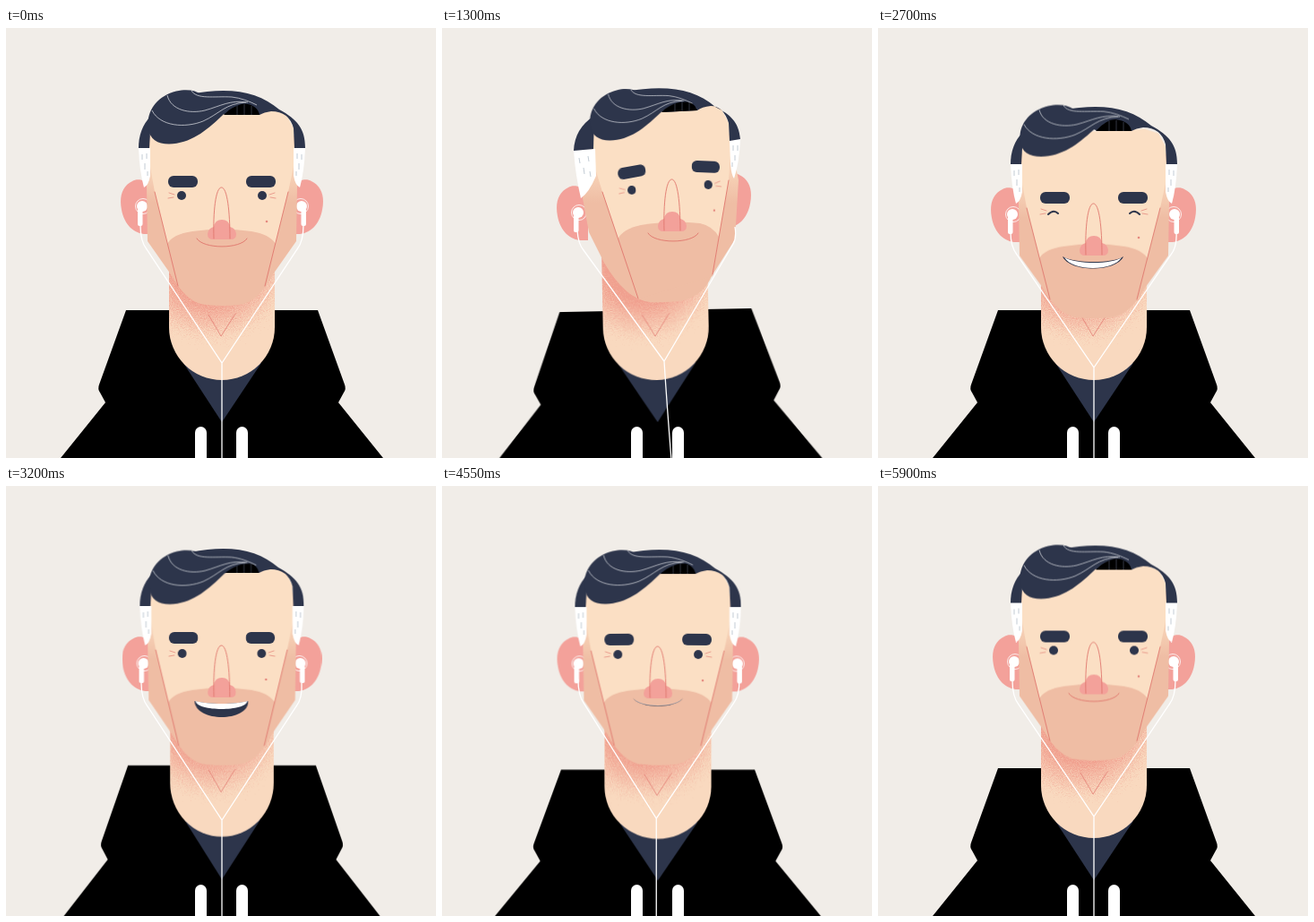
An HTML page without scripts that plays this animation: 480 px wide and 480 px high, repeating every 6000 ms.

```html
<!DOCTYPE html>
<html lang="en">
<head>
<meta charset="utf-8">
<title>Portrait</title>
<style>
html, body { margin: 0; width: 100%; height: 100%; overflow: hidden; background: #f1ede8; }
svg { display: block; width: 100vw; height: 100vh; }

.hair { fill: #2d354b; }
.side { fill: #efbda4; }
.skin { fill: #fbdfc4; }
.pink { fill: #f3a19a; }
.white { fill: #fff; }
.line { fill: none; stroke: #e0776e; stroke-width: .9; stroke-linecap: round; }
.strand { fill: none; stroke: #e4e6ea; stroke-width: .7; }
.closed { fill: none; stroke: #2d354b; stroke-width: 2; stroke-linecap: round; }

.body, .bob, .shell, .eyes, .brow, .nose, .mouth, .quiff, .earL, .earR, .turn, .talk, .cord, .smile, .open, .closed {
  animation: 6s ease-in-out infinite;
}

/* paths that swing between a front view and a three-quarter view */
.turn { animation-name: turn; }
@keyframes turn {
  0%, 39.5%, 100% { d: var(--front); }
  10%, 31% { d: var(--tilt); }
}

.body { animation-name: body; transform-origin: 241px 480px; }
@keyframes body {
  0%, 39.5%, 45%, 85%, 100% { transform: translate(0, 0) scale(1, 1) rotate(0deg); }
  10%, 31% { transform: translate(.5px, 0) scale(1, 1) rotate(-1.1deg); }
  48% { transform: translate(0, 0) scale(1.01, .99) rotate(0deg); }
  53%, 69.5% { transform: translate(0, 0) scale(.98, 1.018) rotate(0deg); }
  76% { transform: translate(0, 0) scale(1.01, .99) rotate(0deg); }
}

.bob { animation-name: bob; transform-origin: 241px 180px; }
@keyframes bob {
  0%, 10%, 29% { transform: translate(0, 0) scale(1); }
  33.5% { transform: translate(0, 5px) scale(1); }
  40% { transform: translate(0, 10px) scale(1); }
  44%, 46% { transform: translate(0, 18px) scale(1); }
  53.3% { transform: translate(0, 0) scale(.985, 1); }
  61% { transform: translate(1px, -6px) scale(.98, 1); }
  68.3% { transform: translate(1.5px, -7px) scale(.977, 1); }
  71.5% { transform: translate(1px, -9px) scale(.98, 1); }
  77.5% { transform: translate(0, 3px) scale(1); }
  85% { transform: translate(0, -1.5px) scale(1); }
  98.3%, 100% { transform: translate(0, -3.5px) scale(1); }
}

.shell { animation-name: shell; transform-origin: 241px 180px; }
@keyframes shell {
  0%, 39%, 78%, 100% { transform: scaleY(1); }
  44%, 46% { transform: scaleY(.97); }
  53.3% { transform: scaleY(1.015); }
  68.3% { transform: scaleY(1.05); }
}

.quiff { animation-name: quiff; transform-origin: 270px 69px; }
@keyframes quiff {
  0%, 39%, 98.3%, 100% { transform: translateY(0) scale(1); }
  10%, 31% { transform: translateY(-1px) scale(.94, .95); }
  45% { transform: translateY(-1.5px) scale(1, .96); }
  53.3% { transform: translateY(2.5px) scale(1); }
  68.3% { transform: translateY(.5px) scale(1); }
  85% { transform: translateY(2px) scale(1); }
}

.earL { animation-name: earL; }
@keyframes earL {
  0%, 39%, 78%, 100% { transform: translate(0, 0); }
  10%, 31% { transform: translate(0, 7px); }
  44%, 46% { transform: translate(-2px, 9px); }
  53.3% { transform: translate(1.5px, -1px); }
  68.3% { transform: translate(5px, -7px); }
  85% { transform: translate(-1px, -1px); }
  98.3% { transform: translate(0, -3px); }
}
.earR { animation-name: earR; }
@keyframes earR {
  0%, 39%, 78%, 100% { transform: translate(0, 0); }
  10%, 31% { transform: translate(-9px, -7px); }
  44%, 46% { transform: translate(1px, 9px); }
  53.3% { transform: translate(-1.5px, -1px); }
  68.3% { transform: translate(-1px, -6px); }
  85% { transform: translate(1px, -1px); }
  98.3% { transform: translate(0, -3px); }
}

.eyes { animation-name: eyes; transform-origin: 241px 180px; }
@keyframes eyes {
  0%, 39.5%, 100% { transform: translate(0, 0) rotate(0deg) scale(1, 1); }
  10%, 31% { transform: translate(13px, -9px) rotate(-4deg) scale(.95, 1); }
}
.brow { animation-name: brow; transform-box: fill-box; transform-origin: center; }
@keyframes brow {
  0%, 39%, 46%, 78%, 100% { transform: translateY(0) rotate(0deg); }
  10%, 31% { transform: translateY(-4.7px) rotate(-6deg); }
  53.3% { transform: translateY(-2px) rotate(0deg); }
  66%, 70% { transform: translateY(-7.5px) rotate(-3deg); }
}
.open, .closed { animation-timing-function: step-end; }
.open { animation-name: open; }
.closed { animation-name: closed; }
@keyframes open { 0%, 49%, 100% { opacity: 1; } 42.5% { opacity: 0; } }
@keyframes closed { 0%, 49%, 100% { opacity: 0; } 42.5% { opacity: 1; } }

.nose { animation-name: nose; }
@keyframes nose {
  0%, 39.5%, 100% { transform: translate(0, 0); }
  10%, 31% { transform: translate(16px, -9px); }
}
.mouth { animation-name: mouth; }
@keyframes mouth {
  0%, 39.5%, 100% { transform: translate(0, 0); }
  10%, 31% { transform: translate(17px, -6px); }
}
.talk { animation-name: talk; }
@keyframes talk {
  0%, 41%, 77%, 100% { d: var(--shut); }
  44%, 47% { d: var(--grin); }
  52%, 70% { d: var(--open); }
}
.smile { animation-name: smile; animation-timing-function: step-end; }
@keyframes smile { 0%, 76.8%, 100% { opacity: 1; } 41.2% { opacity: 0; } }

.cord { animation-name: cord; fill: none; stroke: #fff; stroke-width: 1.3; }
@keyframes cord {
  0%, 39% { d: path("M150 220Q150 238 157 247L241 374Q241 430 241 482M332 220Q332 238 325 247L241 374"); }
  10%, 31% { d: path("M151 226Q152 241 158 248L248 372Q251 420 256 482M327 222Q329 234 325 241L248 372"); }
  44%, 46% { d: path("M148 228Q148 244 155 253L241 379Q241 430 241 482M333 228Q334 244 327 253L241 379"); }
  53.3% { d: path("M151 220Q151 237 158 246L241 373Q241 430 241 482M330 220Q331 237 324 246L241 373"); }
  68.3% { d: path("M154 213Q154 232 160 241L238 372Q238 430 238 482M331 214Q332 232 325 241L238 372"); }
  85% { d: path("M149 219Q149 236 156 245L241 370Q241 430 241 482M333 219Q333 236 326 245L241 370"); }
  98.3%, 100% { d: path("M150 217Q150 235 157 244L241 369Q241 430 241 482M332 217Q332 235 325 244L241 369"); }
}
</style>
</head>
<body>
<svg viewBox="0 0 480 480">
  <defs>
    <radialGradient id="blush" gradientUnits="userSpaceOnUse" cx="228" cy="262" r="86">
      <stop offset=".5" stop-color="#f0a08f"/>
      <stop offset="1" stop-color="#f0a08f" stop-opacity="0"/>
    </radialGradient>
    <linearGradient id="cheek" gradientUnits="userSpaceOnUse" x1="0" y1="165" x2="0" y2="195">
      <stop offset="0" stop-color="#f6d0b5"/>
      <stop offset="1" stop-color="#efbda4"/>
    </linearGradient>
    <filter id="grain" color-interpolation-filters="sRGB">
      <feTurbulence type="fractalNoise" baseFrequency=".9" numOctaves="2" seed="4" result="n"/>
      <feDisplacementMap in="SourceGraphic" in2="n" scale="50" xChannelSelector="R" yChannelSelector="G"/>
    </filter>
    <path id="neck" d="M182 240H300V334A59 59 0 0 1 182 334Z"/>
    <clipPath id="neckClip"><use href="#neck"/></clipPath>

    <g id="ear">
      <path class="pink" d="M163 178C155 168 146 168 141 171C130 176 126 188 129 203C132 220 144 231 158 230L163 230Z"/>
      <circle cx="153" cy="199" r="8.5" fill="none" stroke="#fff" stroke-width=".8"/>
      <circle class="white" cx="152" cy="199" r="6"/>
      <rect class="white" x="147" y="198" width="5.5" height="23" rx="2"/>
    </g>
  </defs>

  <rect width="480" height="480" fill="#f1ede8"/>

  <g class="body">
    <path d="M134 315H348L378 398Q380 403 377 407L371 418L421 480L437 500H45L61 480L111 418L105 407Q102 403 104 398Z"/>
    <path class="hair" d="M198 374L241 440L285 374Z"/>
    <use href="#neck" fill="#f9d9bf"/>
    <g clip-path="url(#neckClip)">
      <rect x="120" y="190" width="240" height="190" fill="url(#blush)" filter="url(#grain)"/>
    </g>
    <path class="line" stroke-opacity=".8" d="M226 320L240 344L256 319"/>
  </g>
  <rect class="white" x="211" y="445" width="13" height="50" rx="6.5"/>
  <rect class="white" x="257" y="445" width="13" height="50" rx="6.5"/>

  <g class="earL"><use href="#ear"/></g>
  <g class="earR"><use href="#ear" transform="translate(482) scale(-1 1)"/></g>

  <g class="bob">
    <g class="shell">
      <path class="turn" fill="url(#cheek)" style='--front:path("M160 120L157 175L158 238L184 275Q202 308 224 309Q241 311 260 309Q281 307 298 275L324 238L325 175L322 120Z");--tilt:path("M168 120L157 190L164 228L181 262Q205 303 232 306Q252 307 270 304Q292 298 301 277L327 236L331 170L321 118Z")'/>
      <path class="skin turn" style='--front:path("M161 110L160 150L166 183L192 288L289 288L315 183L322 150L321 112L313 97L298 92L230 95Z");--tilt:path("M169 108L169 150L179 183L219 302L302 275L320 170L322 140L320 106L312 91L301 86L235 90Z")'/>
      <path class="side turn" style='--front:path("M180 241Q186 230 208 227Q241 222 274 227Q294 230 301 241L290 289L192 289Z");--tilt:path("M196 236Q202 224 222 220Q256 214 288 218Q302 221 309 233L302 277L219 303Z")'/>
      <path class="line turn" style='--front:path("M166 183L192 288M315 183L289 288");--tilt:path("M179 183L219 302M320 170L302 275")'/>
    </g>

    <!-- sideburns -->
    <path class="white turn" style='--front:path("M148 134L161 134L161 165Q159 176 154 178Q149 160 148 134Z");--tilt:path("M147 137L171 135L172 165Q164 184 155 190Q149 165 147 137Z")'/>
    <path class="white turn" style='--front:path("M334 134L321 134L321 165Q323 176 328 178Q333 160 334 134Z");--tilt:path("M333 124L321 126L322 152Q323 164 326 168Q332 150 333 124Z")'/>
    <path class="turn" fill="none" stroke="#bcc6d0" stroke-width=".9" style='--front:path("M152 141L152 147M157 140L157 146M155 151L155 158M158 160L158 165M330 141L330 147M325 140L325 146M327 151L327 158M324 160L324 165");--tilt:path("M153 145L154 151M163 143L164 149M158 156L159 163M165 160L166 166M330 131L330 137M325 131L325 137M327 142L327 148M324 150L324 155")'/>

    <!-- hair -->
    <path class="hair turn" style='--front:path("M162 98Q148 112 148 134L160 134Z");--tilt:path("M170 98Q148 112 147 137L169 135Z")'/>
    <path class="hair turn" style='--front:path("M205 74C250 65 282 71 305 91C325 102 334 112 334 134L322 134L321 112Q316 93 296 93Q288 94 283 97L245 97Q230 90 205 74Z");--tilt:path("M205 71C250 63 282 68 305 88C322 97 331 104 333 124L321 126L320 106Q314 87 300 87Q290 88 285 92L247 94Q230 86 205 71Z")'/>
    <path class="turn" style='--front:path("M243 97L283 97Q281 86 265 84Q255 84 243 97Z");--tilt:path("M245 94L285 92Q281 81 266 79Q256 80 245 94Z")'/>
    <path class="turn" fill="none" stroke="#4a5060" stroke-width=".7" style='--front:path("M258 86L258 97M266 85L266 97M274 87L274 97");--tilt:path("M260 82L260 93M268 80L268 93M276 82L276 92")'/>
    <g class="quiff">
      <path class="hair" d="M159 112C156 94 168 76 190 70.500C203 67.500 212 70 218 74C245 71 262 76 282 86C264 81 252 88 240 99C223 115 206 129 182 129.500C169 129.500 160 124 159 112Z"/>
      <path class="strand" d="M207 70C213 80 232 76 252 77C262 78 272 82 280 86M180 75C184 92 205 96 222 92C240 87 250 80 270 83M163 92C172 110 200 112 220 104C238 96 245 84 268 83"/>
    </g>

    <g class="eyes">
      <g>
        <rect class="hair brow" x="181" y="165" width="33" height="13" rx="6"/>
        <circle class="hair open" cx="196" cy="187" r="5"/>
        <path class="closed" d="M190 190Q196 184 201 189"/>
        <path class="line" stroke-opacity=".7" d="M182 184L188 186M181 190L187 189"/>
      </g>
      <g transform="translate(482) scale(-1 1)">
        <rect class="hair brow" x="181" y="165" width="33" height="13" rx="6"/>
        <circle class="hair open" cx="196" cy="187" r="5"/>
        <path class="closed" d="M190 190Q196 184 201 189"/>
        <path class="line" stroke-opacity=".7" d="M182 184L188 186M181 190L187 189"/>
      </g>
      <circle cx="291" cy="216" r="1.3" fill="#e58a80"/>
    </g>
    <g class="nose">
      <path class="pink" d="M225 230Q226 223 232 222Q233 214 241 214Q249 214 250 222Q256 223 257 230Q257 236 251 236H231Q225 236 225 230Z"/>
      <path class="line" d="M232 235C231 205 234 178 240.500 178C247 178 250 205 250 235"/>
    </g>
    <g class="mouth">
      <path class="line smile" d="M213 235C220 247 262 247 269 235"/>
      <path class="hair talk" style='--shut:path("M213 235C220 247 262 247 269 235C262 247 220 247 213 235Z");--grin:path("M206 237C220 245 262 245 274 237C266 255 214 255 206 237Z");--open:path("M210 240C225 244 257 244 271 240C271 264 211 264 210 240Z")'/>
      <path class="white talk" style='--shut:path("M213 235C220 247 262 247 269 235C262 247 220 247 213 235Z");--grin:path("M208 238C222 246 261 246 272 238C263 254 217 254 208 238Z");--open:path("M211 240C225 244 257 244 270 240C268 252 213 252 211 240Z")'/>
    </g>
  </g>

  <path class="cord"/>
</svg>
</body>
</html>
```
